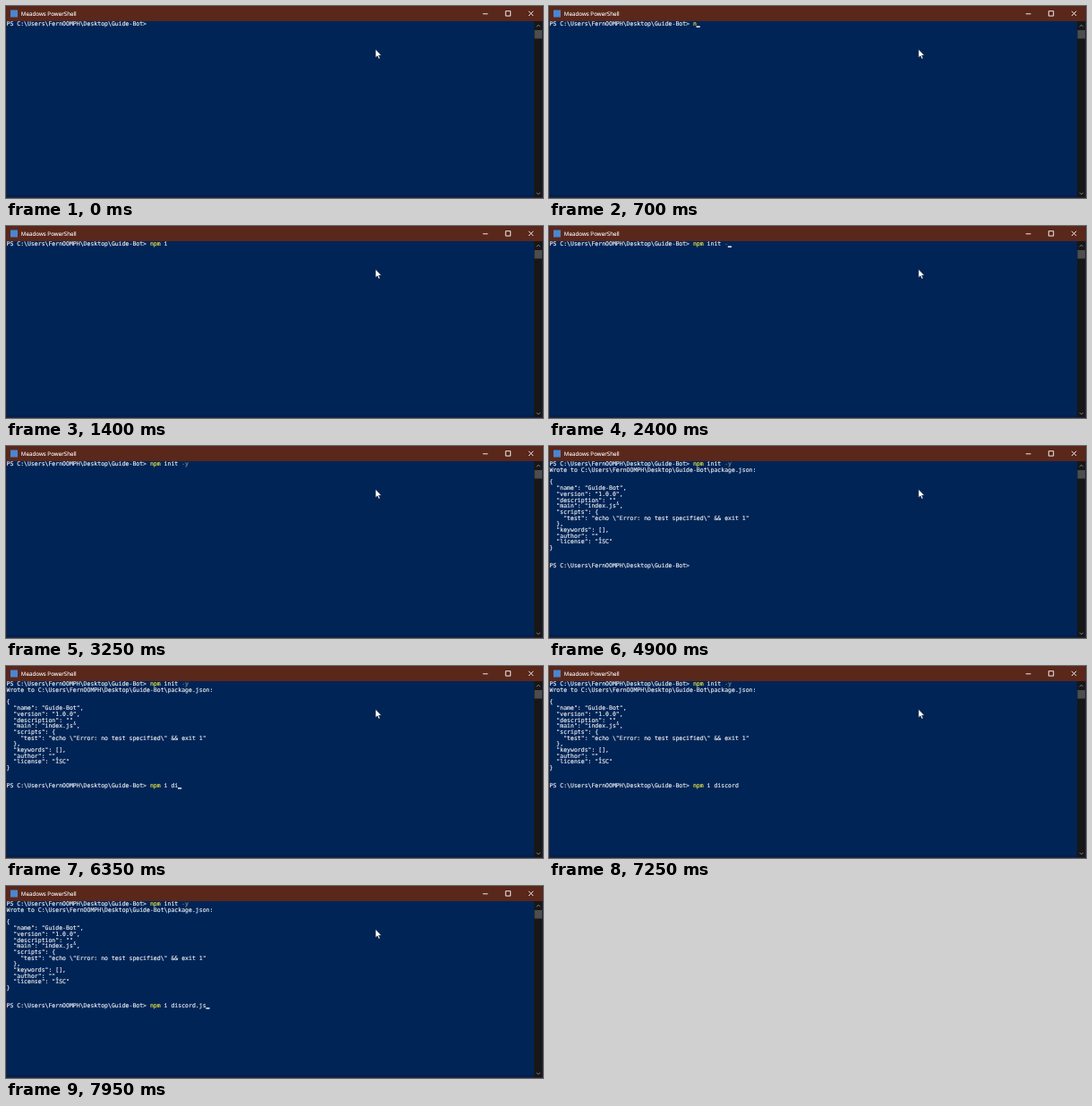
An HTML page for the animation above (8 s loop, 600x215 px).

```html
<!DOCTYPE html>
<html lang="en">
<head>
<meta charset="utf-8">
<title>Terminal</title>
<style>
  html, body { margin: 0; width: 100%; height: 100%; overflow: hidden; background: #012456; }
  svg { display: block; }
  text { white-space: pre; text-rendering: geometricPrecision; fill: #f2f2f4; }
  #screen text { font: 6.51px "DejaVu Sans Mono", monospace; stroke: #f2f2f4; stroke-width: .14; }
  .title { font: 6.25px "Open Sans", sans-serif; fill: #fff; stroke: #fff; stroke-width: .1; }
  .command { fill: #f9f14a; stroke: #f9f14a; }
  .option { fill: #8a8c90; stroke: #8a8c90; }
  .line { fill: none; stroke: #fff; stroke-width: .9; }
</style>
</head>
<body>
<svg width="600" height="215" viewBox="0 0 600 215">
  <rect width="600" height="215" fill="#012456"/>
  <rect y="211" width="590" height="3" fill="#01204f"/>
  <rect x="590" y="17" width="9" height="197" fill="#171717"/>
  <rect x="590.5" y="27" width="8.5" height="9.5" fill="#4d4d4d"/>
  <path class="line" style="stroke:#8a8a8a" d="M592.8 23.2l2-2 2 2M592.8 209l2 2 2-2"/>
  <g id="screen"></g>
  <rect id="caret" width="4.2" height="1.5" fill="#f2f2f4"/>
  <rect width="600" height="17" fill="#5a271b"/>
  <path d="M.25 0V214.7H599.7V0" fill="none" stroke="#4a2426" stroke-width=".6"/>
  <rect x="5" y="4.5" width="8" height="8" fill="#4b86d0"/>
  <text class="title" x="16.8" y="11">Meadows PowerShell</text>
  <path class="line" d="M532.8 8.8h5.6M558.3 5.7h5.4v5.4h-5.4zM584 5.8l5.2 5.2M589.2 5.8l-5.2 5.2"/>
  <path d="M412.9 48.6v9.2l2.1-2 1.5 3.4 1.5-.7-1.5-3.2h2.9z" fill="#fff" stroke="#000a20" stroke-width=".4"/>
</svg>
<script>
const LOOP = 8000, COL = 3.92, ROW = 6.69, LEFT = 0.5, TOP = 17.2, BLINK = 530;
const ENTER = 2750, DONE = 3600, LAST_ROW = 17;
const home = 'C:\\Users\\FernOOMPH\\Desktop\\Guide-Bot';
const prompt = `PS ${home}> `;
const output = String.raw`Wrote to ${home}\package.json:

{
  "name": "Guide-Bot",
  "version": "1.0.0",
  "description": "",
  "main": "index.js",
  "scripts": {
    "test": "echo \"Error: no test specified\" && exit 1"
  },
  "keywords": [],
  "author": "",
  "license": "ISC"
}`.split('\n');

// Each command with the time of every key press.
const first = {
  text: 'npm init -y',
  keys: [600, 750, 900, 1100, 1400, 1550, 1750, 1900, 2100, 2300, 2500]
};
const second = {
  text: 'npm i discord.js',
  keys: [5350, 5450, 5600, 5850, 6000, 6100, 6200, 6280,
         6700, 6850, 7000, 7100, 7250, 7450, 7600, 7750]
};
const allKeys = [...first.keys, ...second.keys];

const screen = document.getElementById('screen');
const caret = document.getElementById('caret');
const rows = Array.from({ length: LAST_ROW + 1 }, (_, i) => {
  const row = document.createElementNS('http://www.w3.org/2000/svg', 'text');
  row.setAttribute('x', LEFT);
  row.setAttribute('y', TOP + i * ROW + 5.2);
  return screen.appendChild(row);
});

const typed = (cmd, t) => cmd.text.slice(0, cmd.keys.filter(k => k <= t).length);

function setCommand(row, text) {
  const markup = prompt.replace('>', '&gt;') + text
    .replace(/-y?$/, '<tspan class="option">$&</tspan>')
    .replace(/^n\w*/, '<tspan class="command">$&</tspan>');
  if (row.dataset.markup !== markup) row.innerHTML = row.dataset.markup = markup;
}

function caretVisible(t) {
  const age = t - Math.max(...allKeys.filter(k => k <= t), -LOOP);
  if (age < 50) return false;
  return age < 350 || Math.floor((t + 450) / BLINK) % 2 === 1;
}

function draw(t) {
  const done = t >= DONE;
  const command = typed(done ? second : first, t);
  setCommand(rows[0], typed(first, t));
  output.forEach((line, i) => rows[i + 1].textContent = done ? line : '');
  if (done) setCommand(rows[LAST_ROW], command);
  else rows[LAST_ROW].textContent = rows[LAST_ROW].dataset.markup = '';

  const running = t >= ENTER && !done;
  const col = running ? 0 : prompt.length + command.length;
  const row = done ? LAST_ROW : running ? 1 : 0;
  caret.setAttribute('x', LEFT + col * COL - 0.6);
  caret.setAttribute('y', TOP + (row + 1) * ROW - 1.4);
  caret.style.visibility = caretVisible(t) ? 'visible' : 'hidden';
}

const start = performance.now();
function tick() {
  draw((performance.now() - start) % LOOP);
  requestAnimationFrame(tick);
}
tick();
</script>
</body>
</html>
```
